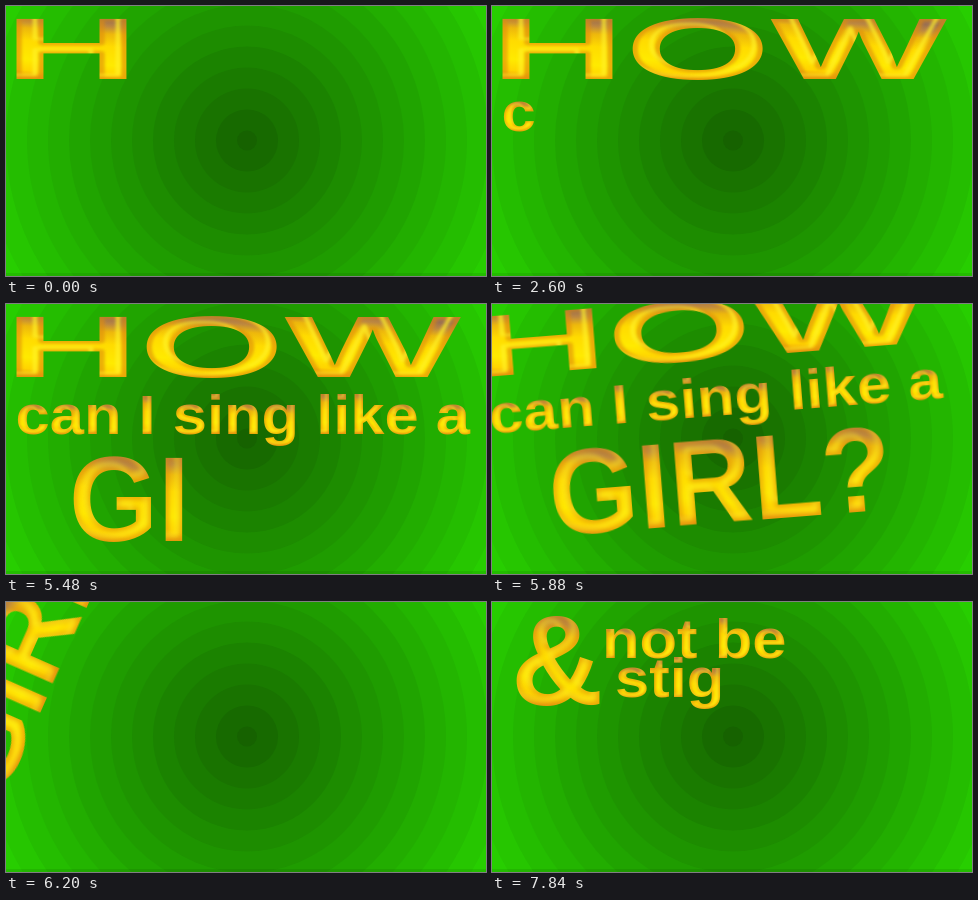
Animation, 480 px wide and 270 px high, one loop 8000 ms. Source, as an HTML page with a canvas:

```html
<!DOCTYPE html>
<html lang="en">
<head>
<meta charset="utf-8">
<title>Gold letters on green</title>
<style>
  html, body { margin: 0; width: 100%; height: 100%; overflow: hidden; background: #27c800; }
  canvas { display: block; width: 480px; height: 270px; }
</style>
</head>
<body>
<canvas id="stage" width="480" height="270"></canvas>
<script>
const W = 480, H = 270, LOOP = 8000;
const SWING_START = 5790, SWING_TIME = 625, SWING_END = 6320;
const ctx = document.getElementById('stage').getContext('2d');

// Each line: origin, font size, horizontal stretch, and one start time per visible letter.
const WIDE = 2.125, NORMAL = 1.118;
const verse = [
  { text: 'HOW', x: -2, y: 73, size: 88, stretch: WIDE, times: [0, 440, 1280] },
  { text: 'can I sing like a', x: 9.5, y: 129.5, size: 55, stretch: NORMAL,
    times: [2600, 2640, 2720, 2800, 2880, 3040, 3240, 3440, 3720, 4000, 4320, 4640, 5000] },
  { text: 'GIRL?', x: 63, y: 236.5, size: 121, stretch: 0.946, times: [5400, 5440, 5520, 5600, 5640] }
];
const reply = [
  { text: '&', x: 19, y: 102.5, size: 128, stretch: 1, times: [6720] },
  { text: 'not be', x: 110, y: 56, size: 55, stretch: NORMAL, times: [6960, 7040, 7120, 7200, 7400] },
  { text: 'stig', x: 123, y: 95, size: 55, stretch: NORMAL, times: [7600, 7680, 7760, 7840] }
];

function makeCanvas() {
  const canvas = document.createElement('canvas');
  canvas.width = W;
  canvas.height = H;
  return canvas;
}

// One letter of polished gold: mauve reflections on top, soft orange bevel around the rim.
function goldLetter(char, line, offset) {
  const canvas = makeCanvas(), g = canvas.getContext('2d');
  g.font = `bold ${line.size}px "Liberation Sans", Arial, sans-serif`;
  g.setTransform(line.stretch, 0, 0, 1, line.x + offset * line.stretch, line.y);
  const box = g.measureText(char);
  const top = -box.actualBoundingBoxAscent, bottom = box.actualBoundingBoxDescent;
  const gold = g.createLinearGradient(box.width * 0.55, top, box.width * 0.4, bottom);
  [[0, '#9a6f52'], [0.1, '#bd8840'], [0.22, '#edb70c'], [0.42, '#ffdb00'],
   [0.72, '#ffea00'], [0.9, '#ffd400'], [1, '#efa008']].forEach(([at, color]) => gold.addColorStop(at, color));
  g.fillStyle = gold;
  g.fillText(char, 0, 0);

  g.globalCompositeOperation = 'source-atop';
  g.lineJoin = 'round';
  g.filter = `blur(${line.size / 50}px)`;
  g.lineWidth = line.size / 18;
  g.strokeStyle = 'rgba(222,140,10,.6)';
  g.strokeText(char, 0, 0);
  g.lineWidth = line.size / 40;
  g.strokeStyle = 'rgba(255,242,40,.7)';
  g.strokeText(char, -line.size / 22, -line.size / 22);
  return canvas;
}

function buildLetters(lines) {
  return lines.flatMap(line => {
    ctx.font = `bold ${line.size}px "Liberation Sans", Arial, sans-serif`;
    let next = 0;
    return [...line.text].flatMap((char, i) => char === ' ' ? [] : [{
      line,
      start: line.times[next++],
      image: goldLetter(char, line, ctx.measureText(line.text.slice(0, i)).width)
    }]);
  });
}

function buildBackground() {
  const canvas = makeCanvas(), g = canvas.getContext('2d');
  for (let i = 13; i >= 0; i--) {
    const k = i / 13;
    g.fillStyle = `rgb(${22 + 17 * k},${98 + 108 * k},0)`;
    g.beginPath();
    g.arc(241, 134.5, 10 + 21 * i, 0, Math.PI * 2);
    g.fill();
  }
  g.fillStyle = 'rgba(0,40,0,.1)';
  g.fillRect(0, 267, W, 3);
  return canvas;
}

const background = buildBackground();
const verseLetters = buildLetters(verse);
const replyLetters = buildLetters(reply);

function drawLetters(letters, t) {
  for (const { line, start, image } of letters) {
    if (t < start) continue;
    // The second line sits higher until its first capital arrives.
    const lift = line === verse[1] && t < line.times[3] ? -5 : 0;
    ctx.drawImage(image, 0, lift);
  }
}

function draw(t) {
  ctx.drawImage(background, 0, 0);
  if (t < SWING_END) {
    const phase = t < 5840 ? 0 : (t - SWING_START) / SWING_TIME;
    const angle = Math.PI / 4 * (1 - Math.cos(Math.PI * phase));
    ctx.save();
    ctx.translate(0, H);
    ctx.rotate(-angle);
    ctx.translate(0, -H);
    drawLetters(verseLetters, t);
    ctx.restore();
  }
  drawLetters(replyLetters, t);
}

const origin = performance.now();
function tick() {
  const t = (performance.now() - origin) % LOOP;
  draw(Math.floor(t / 40) * 40);
  requestAnimationFrame(tick);
}
tick();
</script>
</body>
</html>
```
